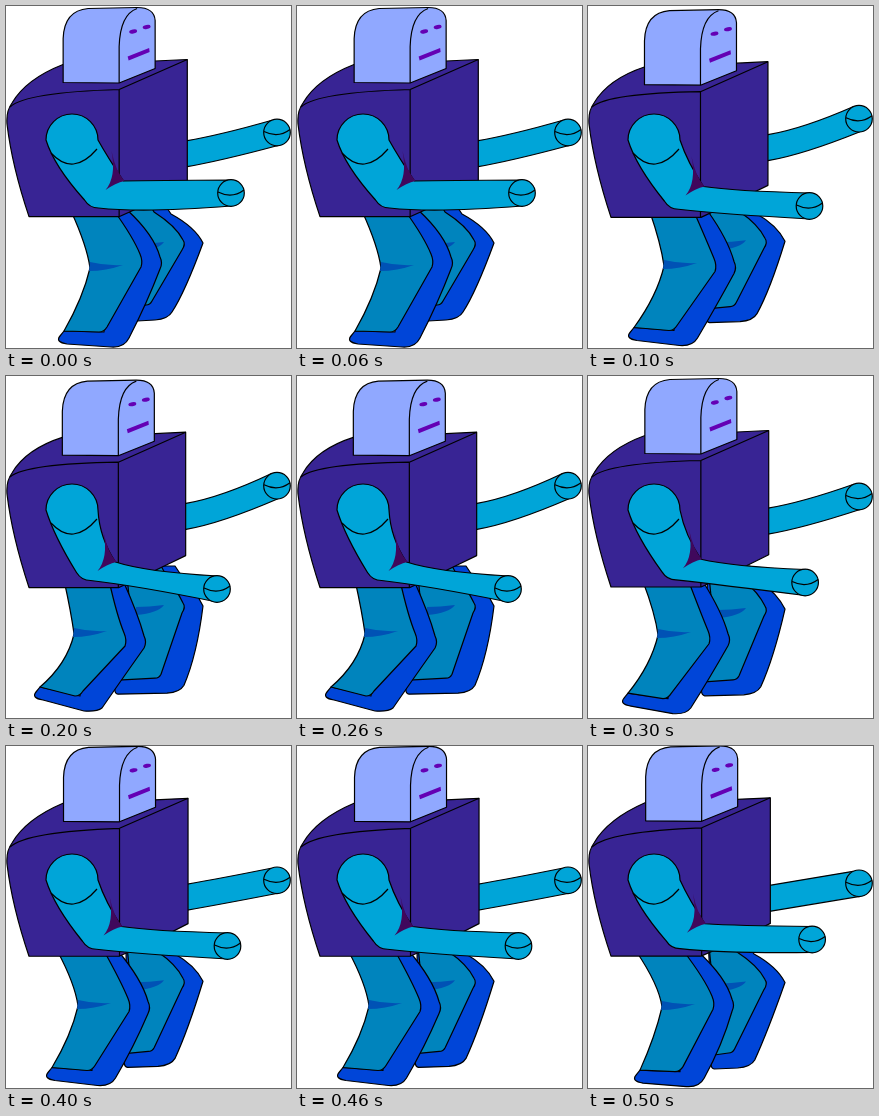
An HTML page for the animation above (600 ms loop, 285x342 px).

```html
<!DOCTYPE html>
<html>
<head>
<meta charset="utf-8">
<style>
html, body { margin: 0; width: 100%; height: 100%; overflow: hidden; background: #fff; }
svg { display: block; width: 100%; height: 100%; }
path, circle { stroke: #000; stroke-width: 1.2; stroke-linejoin: round; }
.flat { stroke: none; }
.line { fill: none; }
</style>
</head>
<body>
<svg id="stage" viewBox="0 0 285 342"></svg>
<script>
const STEP = 100, COUNT = 6;
const SKIN = '#00a5d8', LEG = '#0084bd', SOLE = '#0045d8',
      BODY = '#382494', HEAD = '#90a8ff', SHADE = '#0052b5', INK = '#6400b4';

const path = (fill, d) => `<path fill="${fill}" d="${d}"/>`;
const flat = (fill, d) => `<path class="flat" fill="${fill}" d="${d}"/>`;
const line = d => `<path class="line" d="${d}"/>`;
const eye = (x, y) => `<ellipse cx="${x}" cy="${y}" rx="4" ry="2" fill="${INK}" transform="rotate(-10 ${x} ${y})"/>`;
const hand = (x, y) => `<circle cx="${x}" cy="${y}" r="13.3" fill="${SKIN}"/>` +
  line(`M${x - 13},${y - 1}Q${x + 1},${y + 6} ${x + 13},${y - 3}`);

function farArm(bob) {
  const y = 133.5 - 6.5 * bob, hy = 123.5 - 14.5 * bob;
  return path(SKIN, `M170,${y + 2}L180,${y}Q215,${y - 6} 265,${hy - 12}L272,${hy + 13}Q215,${y + 20} 180,${y + 26}L170,${y + 27}Z`) +
    hand(271, hy);
}

function farLeg(step, swing, ease) {
  const hip = 148 + 16 * ease, kx = 178, ky = 238 - 7 * ease,
        hx = 144 + 9 * ease, hy = 299 + 1.6 * step,
        toe = 131 - 19 * swing, sole = 166 + 12 * ease;
  return path(SOLE, `M120,190L${hip + 5},190L${hip + 17},208Q${kx + 11},${ky - 17} ${kx + 19},${ky - 1}` +
      `Q${sole + 13},${ky + 48} ${sole},${hy + 7}Q${sole - 4},${hy + 14} ${sole - 17},${hy + 15}L${toe},${hy + 16}Q${toe - 6},${hy + 15} ${toe - 1},${hy}Z`) +
    path(LEG, `M120,190L${hip - 9},190L${hip},206Q${kx - 8},${ky - 18} ${kx - 1},${ky - 4}Q${kx + 2},${ky} ${kx - 2},${ky + 6}` +
      `L${hx + 2},${hy - 4}Q${hx},${hy} ${hx - 4},${hy}L${toe},${hy + 2}L125,240Z`) +
    flat(SHADE, `M${kx - 48},${ky}Q${kx - 35},${ky} ${kx - 20},${ky - 2}Q${kx - 26},${ky + 6} ${kx - 48},${ky + 8}Z`);
}

function nearLeg(step, swing, ease) {
  const hip = 67 - 3.4 * step, kx = 84 - 13.3 * swing - 1.33 * step, ky = 262 - 4 * swing,
        toe = 58 - 24 * swing, ty = 325 - 14 * ease,
        hx = toe + 40, hy = 326 - 6 * ease,
        fx = kx + 52, fy = 255 + 9 * swing,
        top = hip * .75 + 61, sole = 123 - 27 * swing;
  return path(SOLE, `M${hip + 30},205L${top + 11},205Q${fx + 12},${fy - 26} ${fx + 18},${fy - 4}Q${fx + 21},${fy + 2} ${fx + 18},${fy + 8}` +
      `Q${sole + 18},${fy + 42} ${sole},332Q${sole - 5},${hy + 16} ${sole - 18},${hy + 15}L${toe + 3},${ty + 13}Q${toe - 9},${ty + 11} ${toe - 4},${ty + 5}L${toe},${ty}L${hx},${hy}Z`) +
    path(LEG, `M${hip - 2},205Q${kx - 3},${ky - 22} ${kx},${ky}Q${kx - 7},${ky + 30} ${toe},${ty}L${hx - 5},${hy}Q${hx},${hy} ${hx + 3},${hy - 5}` +
      `L${fx - 1},${fy + 6}Q${fx + 1},${fy} ${fx - 2},${fy - 7}Q${fx - 9},${fy - 24} ${top - 3},205Z`) +
    flat(SHADE, `M${kx},${ky - 6}Q${kx + 16},${ky - 2} ${kx + 33},${ky - 3}Q${kx + 16},${ky + 3} ${kx - 1},${ky + 3}Z`);
}

function torso(dx, dy) {
  const cx = 113 + dx / 2, cy = 83 + dy, rx = 181 + dx, ry = 53 + dy, low = 210.5 + dy / 3;
  return path(BODY, `M23,${low}Q6,160 1,118Q0,105 6,97Q20,73 57,${58 + dy}L149,${ry + 1.5}L${rx},${ry}` +
      `V${178 + dy / 2}L150,194L113,${low}Z`) +
    line(`M4,101Q20,${86 + dy / 2} ${cx},${cy}L${rx},${ry}M${cx},${cy}V${low}`);
}

function head(dx, dy) {
  return `<g transform="translate(${dx / 2} ${dy})">` +
    path(HEAD, 'M57,76V32Q58,4 82,2L131,1Q148,1 149,14V62L113,76.5Z') +
    line('M113,76.5V40Q114,8 131,2') +
    eye(127, 25) + eye(140.5, 20.5) +
    flat(INK, 'M121.5,50L143,41.5L143.5,45.5L122.5,54Z') + '</g>';
}

function nearArm(swing, ease) {
  const x = 225 - 14 * ease, y = 187 + 26 * swing,
        ex = 117.5 - 8 * ease, ey = 175 + 11 * swing, low = 202 + 2.5 * swing;
  return path(SKIN, `M40,134A26,26 0 0 1 92,134Q${ex - 16},${ey - 24} ${ex},${ey}Q${ex + 30},${ey + (y - 13 - ey) * .7} ${x},${y - 13}V${y + 13}` +
      `Q${ex + 20},${low + 5} ${ex - 25},${low}Q${ex - 34},${low} ${ex - 39},${low - 8}Q48,160 40,134Z`) +
    line('M45,147Q67,171 91,143') +
    flat('#40085c', `M${ex - 12},${ey - 30}Q${ex - 8},${ey - 10} ${ex + 1},${ey}Q${ex - 8},${ey + 2} ${ex - 18},${ey + 9}Q${ex - 7},${ey - 4} ${ex - 12},${ey - 30}Z`) +
    hand(x, y);
}

function figure(step) {
  // Limbs swing back in two steps and return in four; the trunk bobs evenly.
  const swing = step < 2 ? step / 2 : (COUNT - step) / 4, ease = swing * swing;
  const bob = Math.cos((step - 1.7) / COUNT * 2 * Math.PI);
  const dx = -1.4 * bob, dy = 1 + 2.3 * bob;
  return farArm(bob) + farLeg(step, swing, ease) + nearLeg(step, swing, ease) +
    torso(dx, dy) + head(dx, dy) + nearArm(swing, ease);
}

const stage = document.getElementById('stage');
let shown = -1;

function draw() {
  const step = Math.floor(performance.now() / STEP) % COUNT;
  if (step !== shown) stage.innerHTML = figure(shown = step);
  requestAnimationFrame(draw);
}
draw();
</script>
</body>
</html>
```
